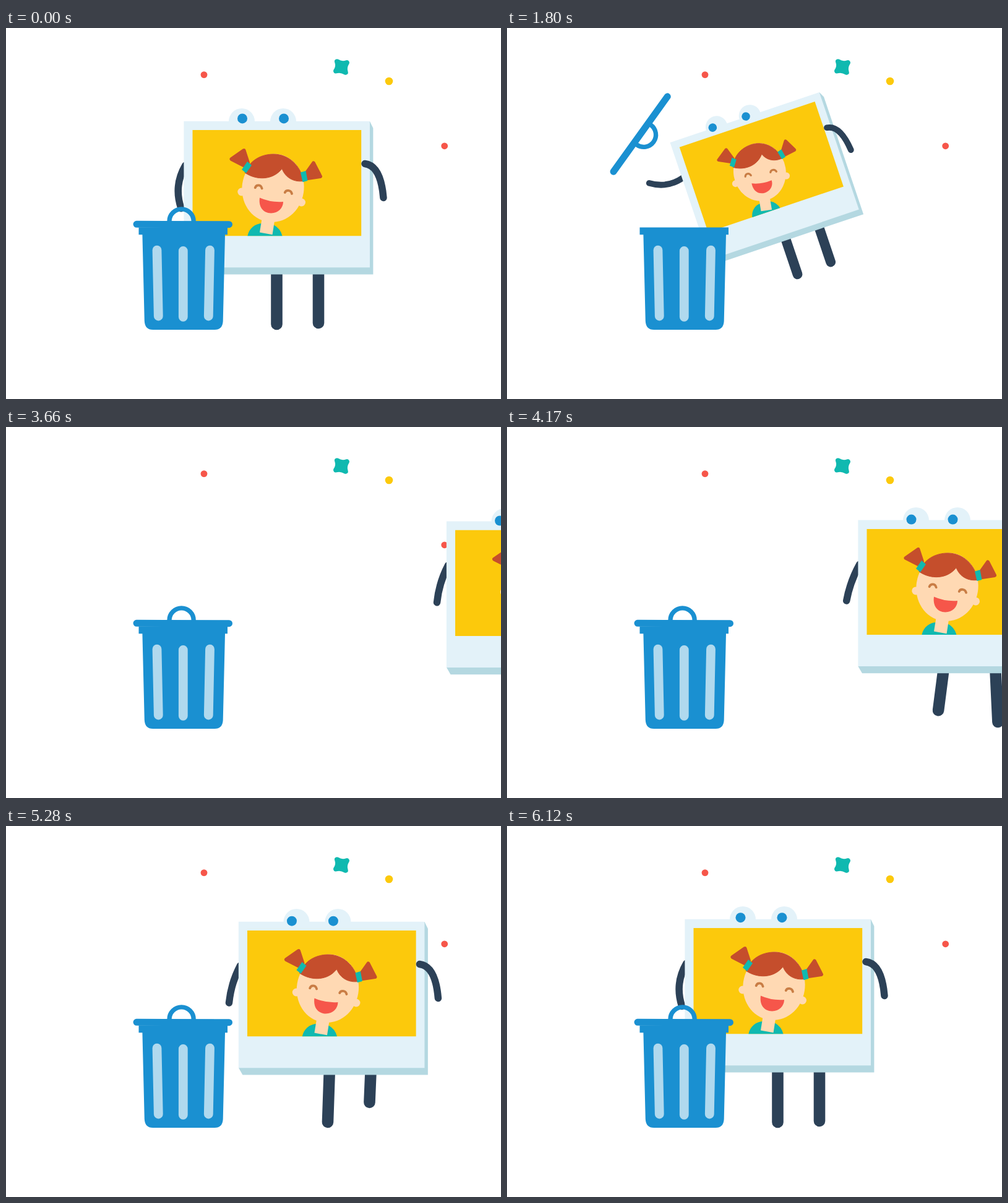
These frames come from a looping animation (800x600 px, 6.15 s). An HTML page:

```html
<!DOCTYPE html>
<html lang="en">
<head>
<meta charset="utf-8">
<title>Photo and bin</title>
<style>
  html, body { margin: 0; width: 100%; height: 100%; overflow: hidden; background: #fff; }
  svg { display: block; width: 100vw; height: 100vh; }
  .navy { stroke: #2c4157; fill: none; stroke-linecap: round; }
  .blue { fill: #1a90d1; }
  .pale { fill: #e3f2f9; }
  .teal { fill: #10b9b0; }
  .hair { fill: #c54e2c; stroke: #c54e2c; stroke-linejoin: round; }
  .skin { fill: #ffd9b3; }
  .red { fill: #f6564a; }
</style>
</head>
<body>
<svg viewBox="0 0 800 600">
  <defs><clipPath id="pic"><rect x="301.5" y="165" width="272.7" height="171.2"/></clipPath></defs>

  <circle class="red" cx="320" cy="75.6" r="5.4"/>
  <circle class="red" cx="708.7" cy="190.8" r="5.4"/>
  <circle cx="619" cy="86" r="6.3" fill="#fcc90c"/>
  <path class="teal" stroke="#10b9b0" stroke-width="8" stroke-linejoin="round"
    d="M535 54.2Q542.5 59 551 56Q546 63.5 548.8 71.8Q541 67 533 69.5Q538 62 535 54.2Z"/>

  <g id="photo">
    <path id="legL" class="navy" stroke-width="18.6"/>
    <path id="legR" class="navy" stroke-width="18.6"/>
    <path id="armL" class="navy" stroke-width="11.5"/>
    <path fill="#b4d8e1" d="M287.4 387L294 398.4H593.4V162L588 151Z"/>
    <path class="pale" d="M287.4 150.7H586Q588 150.7 588 153V387.2H287.4Z"/>
    <circle class="pale" cx="381" cy="151" r="21"/>
    <circle class="pale" cx="448" cy="151" r="21"/>
    <g id="pupils" class="blue">
      <circle cx="381" cy="151" r="8"/>
      <circle cx="448" cy="151" r="8"/>
    </g>
    <g clip-path="url(#pic)">
      <rect x="301" y="164" width="274" height="174" fill="#fcc90c"/>
      <path class="teal" d="M390 338C392 324 403 316 414 316L432 318Q444 324 447 338Z"/>
      <path class="skin" d="M414 306L434 312L430.5 334.3L410 330.5Z"/>
      <path class="hair" stroke-width="6" d="M384.5 198L364.5 212L386 223L391 218Z"/>
      <path class="hair" stroke-width="6" d="M497 218.5L508 240L488 243L486 234Z"/>
      <ellipse class="skin" cx="431.5" cy="258.8" rx="50" ry="55.4" transform="rotate(9 431.5 258.8)"/>
      <circle class="skin" cx="380.8" cy="265" r="6.5"/>
      <circle class="skin" cx="477.5" cy="282" r="6.5"/>
      <path class="hair" d="M386 234C394 214 412 204 433 204C457 204.500 476 222 481 247.500C466 249.500 452 243 446 227.500C432 246 405 247 386 234Z"/>
      <path class="teal" d="M390 216L397 222L388 234.800L381 229Z"/>
      <path class="teal" d="M476 233.500L484.500 231L487.500 247L479.500 249.200Z"/>
      <path fill="none" stroke="#c97d45" stroke-width="3.800" stroke-linecap="round"
        d="M402.700 258.300C404.500 253 412 253 413.600 259.500M450.800 266C452.500 261.500 460.500 261.500 462 268"/>
      <path class="red" d="M410 274.500Q428 282.500 448 281C448 291 440 299.500 428.500 299.500C415 299 408 289 410 274.500Z"/>
    </g>
    <path id="armR" class="navy" stroke-width="11.5"/>
  </g>

  <path class="blue" d="M214.5 322.5H358V334.3H354L350.7 474Q350 488 337 488H237.5Q224.5 488 223.8 474L220.4 334.3H214.5Z"/>
  <path fill="none" stroke="#b0d9ee" stroke-width="14.8" stroke-linecap="round"
    d="M244 359.2L246.3 466M286.3 360.5V467.3M329.5 359.2L327.3 466"/>

  <g id="lid" fill="none" stroke="#1a90d1">
    <path stroke-width="11" stroke-linecap="round" d="M211 317.3L360.500 317.700"/>
    <path stroke-width="7.300" d="M264 315V312.500A19.600 19.600 0 0 1 303.200 312.500V315"/>
  </g>
</svg>
<script>
const LOOP = 6150, STEP = 30, TAU = Math.PI * 2;
const OPEN = 1110, LEAP = 1500, GONE = 2115, RETURN = 3270, STRIDE = 468;

// Arm poses: angle clockwise from straight down, length, bulge.
const REST = [5.7, 70, 16], HOLD = [122, 62, 4], FLING = [99.2, 66, -16], STROLL = [16.7, 62.6, 6];
// Where the pupils look.
const LEFT = [-7.5, -1.3], RIGHT = [10, -8], HOME = [1, -3];

const el = id => document.getElementById(id);
const set = (id, name, value) => el(id).setAttribute(name, value);
const part = (t, a, b) => Math.min(1, Math.max(0, (t - a) / (b - a)));
const ramp = (t, a, b) => { const u = part(t, a, b); return u * u * (3 - 2 * u); };
const hump = (t, a, b) => Math.sin(Math.PI * part(t, a, b)) ** 2;
const during = (t, a, b) => ramp(t, a, a + 150) * (1 - ramp(t, b - 150, b));
const mix = (a, b, k) => a + (b - a) * k;
const blend = (a, b, k) => a.map((v, i) => mix(v, b[i], k));

function limb(id, x, y, [deg, len, bulge], along = .5) {
  const a = deg / 360 * TAU, s = Math.sin(a), c = Math.cos(a);
  const cx = x - s * len * along - c * bulge, cy = y + c * len * along - s * bulge;
  set(id, 'd', `M${x} ${y}Q${cx} ${cy} ${x - s * len} ${y + c * len}`);
}

// A foot swings forward while lifted and slides back on the floor.
function leg(id, x, floor, phase, weight, lean) {
  const foot = x + lean - 20 * weight * Math.sin(TAU * phase);
  const lift = 30 * weight * Math.max(0, Math.cos(TAU * phase));
  set(id, 'd', `M${x} 300L${foot} ${floor - lift}`);
}

// Leap into the bin: up in an arc, then turning and shrinking.
function leap(t) {
  const u = part(t, LEAP, LEAP + 600);
  const grow = (end, power) => Math.min(1, u / end) ** power;
  return {
    x: -152 * grow(.8, 4.16), y: u * (402 * u - 284),
    turn: -72 * grow(1, 1.95), scale: 1 - .71 * grow(.85, 2.89)
  };
}

function drawPhoto(t) {
  const back = t >= RETURN;
  set('photo', 'visibility', t < GONE || back ? 'visible' : 'hidden');

  const first = during(t, 3000, 4400);
  const left = first + during(t, 4500, 5740), second = during(t, 4650, 5740);
  const cycle = (t - 5280) / STRIDE;
  const bob = (2 * first + 4 * second) * Math.cos(2 * TAU * cycle);
  const sink = back ? bob : 12 * ramp(t, OPEN - STEP, 1290);

  const jump = leap(back ? 0 : t);
  const walk = t < 4400 ? mix(535, 220.5, part(t, RETURN, 4380)) : mix(220.5, 0, part(t, 4650, 5702));
  const x = back ? walk : jump.x;
  set('photo', 'transform', `translate(${437.5 + x} ${269 + sink + jump.y}) ` +
    `rotate(${jump.turn}) scale(${jump.scale}) translate(-437.5 -269)`);

  const lean = back ? -6 * (1 - ramp(t, 5500, 5740)) : 0;
  leg('legL', 437.5, 479 - sink, cycle + .5, back ? left : 0, lean);
  leg('legR', 505, 477 - sink, cycle, back ? first + second : 0, lean);

  const arm = back
    ? blend(blend(STROLL, FLING, hump(t, 4140, 4620)), REST, ramp(t, 5600, 6180))
    : blend(blend(REST, HOLD, ramp(t, OPEN - STEP, 1290)), FLING, ramp(t, LEAP, 1800));
  limb('armL', 290, 222, arm);
  const wave = Math.sin(TAU * part(t, 30, 720)) ** 2;
  limb('armR', 580, 219.5, [-28.6 - 20 * wave, 62.6, -21], .24);

  // The glance to the right runs across the loop point.
  const s = t > 5790 ? t - LOOP : t;
  const glance = blend(LEFT, RIGHT, ramp(s, -81, 84));
  const look = blend(blend(glance, HOME, ramp(s, 540, 720)), LEFT, ramp(s, 870, 930));
  set('pupils', 'transform', `translate(${look})`);
}

// The lid swings open around the shoulder, floats, falls and bounces.
function drawLid(t) {
  const fall = part(t, 1800, 2310), arc = hump(t, 1800, 2310), bounce = hump(t, 2310, 2490);
  const turn = 125.5 * ramp(t, OPEN - STEP, 1290) * (1 - fall * fall) - 2 * bounce;
  const float = 5 * ramp(t, LEAP, 1800) * (1 - fall);
  set('lid', 'transform',
    `translate(${72 * arc} ${-58 * arc - float - 7 * bounce}) rotate(${turn} 287 229)`);
}

const start = performance.now();
function tick(now) {
  const time = Math.max(0, now - start) % LOOP;
  const t = Math.floor(time / STEP) * STEP;
  drawPhoto(t);
  drawLid(t);
  requestAnimationFrame(tick);
}
tick(start);
</script>
</body>
</html>
```
